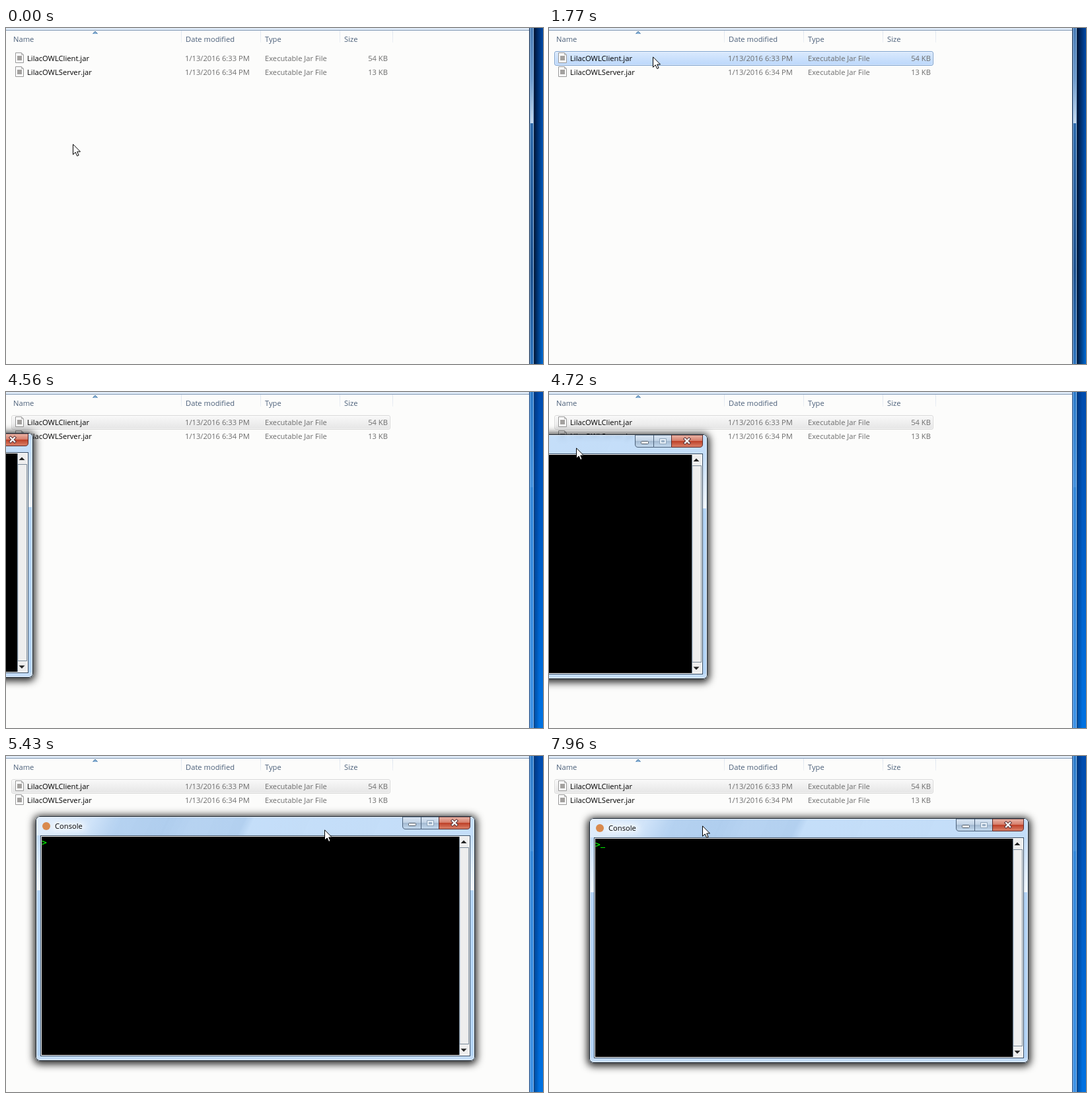
An HTML page for the animation above (8000 ms loop, 813 px wide and 508 px high).

```html
<!DOCTYPE html>
<html lang="en">
<head>
<meta charset="utf-8">
<title>File list and console</title>
<style>
  html, body { margin: 0; width: 100%; height: 100%; overflow: hidden; background: #fcfcfb; }
  svg { position: absolute; left: 0; top: 0; display: block; }
  text { font: 11.2px "Open Sans", "Noto Sans", sans-serif; }
  .head text { fill: #4c607a; }
  .info { fill: #6d6d6d; }
  #console {
    position: absolute; left: 0; top: -1px; width: 665px; height: 370px;
    border-radius: 6px;
    background:
      linear-gradient(115deg, rgba(255,255,255,.45) 4%, rgba(255,255,255,.2) 13%, rgba(120,165,212,.18) 19%,
        rgba(120,165,212,.26) 30%, rgba(120,165,212,.16) 36%, rgba(120,165,212,.22) 47%,
        rgba(200,228,255,.25) 49%, rgba(200,228,255,.2) 82%) 0 0 / 100% 29px no-repeat,
      rgba(184,214,246,.84);
    backdrop-filter: blur(2.5px);
    box-shadow: inset 0 0 0 1px #1c2a38, inset 0 0 0 2px rgba(255,255,255,.7), 0 2px 12px 3px rgba(0,0,0,.85);
  }
  #console svg { top: 1px; }
  .prompt { font: bold 13px "DejaVu Sans Mono", monospace; fill: #00e400; }
</style>
</head>
<body>
<svg width="813" height="508">
  <defs>
    <linearGradient id="hoverFill" x2="0" y2="1"><stop stop-color="#f8fbff"/><stop offset="1" stop-color="#e6f1fe"/></linearGradient>
    <linearGradient id="pickFill" x2="0" y2="1"><stop stop-color="#dbeafd"/><stop offset="1" stop-color="#bbd7fb"/></linearGradient>
    <linearGradient id="idleFill" x2="0" y2="1"><stop stop-color="#f9f9f9"/><stop offset="1" stop-color="#e5e5e5"/></linearGradient>
    <linearGradient id="divider" x2="0" y2="1"><stop stop-color="#dde5ef"/><stop offset="1" stop-color="#eceff4"/></linearGradient>
    <linearGradient id="desk" x2="0" y2="1"><stop stop-color="#004cae"/><stop offset="1" stop-color="#0072e2"/></linearGradient>
    <linearGradient id="deepShade"><stop stop-color="#000a20" stop-opacity=".92"/><stop offset=".35" stop-color="#000f2c" stop-opacity=".62"/><stop offset="1" stop-color="#00183c" stop-opacity=".08"/></linearGradient>
    <linearGradient id="softShade"><stop stop-color="#001840" stop-opacity=".45"/><stop offset=".6" stop-color="#001840" stop-opacity="0"/></linearGradient>
    <linearGradient id="edgeOn" x2="0" y2="1">
      <stop stop-color="#4a7db6"/><stop offset=".15" stop-color="#6d9bcd"/><stop offset=".283" stop-color="#c6daee"/>
      <stop offset=".284" stop-color="#2f6cad"/><stop offset=".72" stop-color="#1f5390"/><stop offset="1" stop-color="#2f76bf"/>
    </linearGradient>
    <linearGradient id="edgeOff" x2="0" y2="1">
      <stop stop-color="#2f7cc9"/><stop offset=".283" stop-color="#4593df"/><stop offset=".284" stop-color="#3488da"/><stop offset="1" stop-color="#3f93e6"/>
    </linearGradient>
  </defs>

  <rect width="792" height="3" fill="#dfeaf7"/>
  <rect y="3" width="792" height="1" fill="#8299b5"/>
  <rect x="792" width="21" height="508" fill="url(#desk)"/>
  <g id="edgeActive">
    <rect x="799" width="14" height="508" fill="url(#deepShade)"/>
    <rect x="792" width="8" height="508" fill="#0c2548"/>
    <rect x="793" width="6" height="508" fill="#8fb5dd"/>
    <rect x="794" width="4" height="508" fill="url(#edgeOn)"/>
  </g>
  <g id="edgeIdle">
    <rect x="799" width="14" height="508" fill="url(#softShade)"/>
    <rect x="792" width="8" height="508" fill="#14407a"/>
    <rect x="793" width="6" height="508" fill="#7fb6ee"/>
    <rect x="794" width="4" height="508" fill="url(#edgeOff)"/>
  </g>

  <g class="head">
    <path d="M131 9 135 5 139 9Z" fill="#8db4d8"/><path d="M131.5 8.5 135 5.2 138.5 8.5" fill="none" stroke="#3c6f9f"/>
    <g fill="url(#divider)">
      <rect x="265" y="4" width="1" height="18"/><rect x="385" y="4" width="1" height="18"/>
      <rect x="505" y="4" width="1" height="18"/><rect x="585" y="4" width="1" height="18"/>
    </g>
    <text x="11" y="21">Name</text><text x="272" y="21">Date modified</text>
    <text x="392" y="21">Type</text><text x="512" y="21">Size</text>
  </g>

  <g id="hoverLower"><rect x="8.5" y="56.5" width="573" height="21" rx="2.5" fill="url(#hoverFill)" stroke="#b8d6fb"/></g>
  <g id="hoverUpper"><rect x="8.5" y="35.5" width="573" height="21" rx="2.5" fill="url(#hoverFill)" stroke="#b8d6fb"/></g>
  <g id="picked">
    <rect x="8.5" y="35.5" width="573" height="21" rx="2.5" fill="url(#pickFill)" stroke="#7da2ce"/>
    <rect x="9.5" y="36.5" width="571" height="19" rx="1.5" fill="none" stroke="#fff" stroke-opacity=".45"/>
  </g>
  <g id="idle">
    <rect x="8.5" y="35.5" width="573" height="21" rx="2.5" fill="url(#idleFill)" stroke="#d9d9d9"/>
    <rect x="9.5" y="36.5" width="571" height="19" rx="1.5" fill="none" stroke="#fff" stroke-opacity=".5"/>
  </g>
  <g id="files"></g>
</svg>

<div id="console">
  <svg width="665" height="369">
    <defs>
      <linearGradient id="shine" x2="0" y2="1"><stop stop-color="#fff" stop-opacity="0"/><stop offset="1" stop-color="#fff" stop-opacity=".8"/></linearGradient>
      <linearGradient id="glassKey" x2="0" y2="1"><stop stop-color="#dce8f5"/><stop offset=".48" stop-color="#c0d2e5"/><stop offset=".5" stop-color="#a3b9d0"/><stop offset="1" stop-color="#c5dbf0"/></linearGradient>
      <linearGradient id="closeKey" x2="0" y2="1"><stop stop-color="#ecb9ac"/><stop offset=".48" stop-color="#d57b68"/><stop offset=".5" stop-color="#bd3f27"/><stop offset="1" stop-color="#dc846c"/></linearGradient>
      <filter id="soft" x="-30%" y="-80%" width="160%" height="260%"><feGaussianBlur stdDeviation="5"/></filter>
    </defs>
    <rect x="2" y="29" width="5" height="82" fill="url(#shine)"/>
    <rect x="658" y="29" width="5" height="82" fill="url(#shine)"/>
    <rect x="2" y="111" width="5" height="250" fill="#9cc6f2" fill-opacity=".4"/>
    <rect x="658" y="111" width="5" height="250" fill="#9cc6f2" fill-opacity=".4"/>

    <rect x="24" y="8" width="52" height="13" rx="6" fill="#fff" fill-opacity=".65" filter="url(#soft)"/>
    <circle cx="16" cy="14" r="6" fill="#d98a4e"/>
    <text x="29" y="18">Console</text>

    <g stroke="#4b6079">
      <path d="M555.5 0V14Q555.5 18.5 560 18.5H583.5V0Z" fill="url(#glassKey)"/>
      <path d="M583.5 0V18.5H610.5V0Z" fill="url(#glassKey)"/>
      <path d="M610.5 0V18.5H653Q657.5 18.5 657.5 14V0Z" fill="url(#closeKey)" stroke="#5b2a2a"/>
    </g>
    <rect x="564.5" y="9.5" width="11" height="4" rx="1" fill="#fff" stroke="#4d5a68"/>
    <path d="M592.5 5.5H602.5V13.5H592.5ZM595.5 8.5H599.5V10.5H595.5Z" fill="#e4edf6" stroke="#8ea4ba" fill-rule="evenodd"/>
    <path d="M631 6 637 12M637 6 631 12" stroke="#5c3438" stroke-width="4.4" stroke-linecap="square"/>
    <path d="M631 6 637 12M637 6 631 12" stroke="#fff" stroke-width="2.3" stroke-linecap="square"/>

    <rect x="7.5" y="28.5" width="650" height="333" fill="#fff" stroke="#3a4d62"/>
    <rect x="9" y="30" width="632" height="330"/>

    <rect x="641" y="30" width="15" height="330" fill="#eee"/>
    <path d="M641.5 30V360M641 46.5H656M641 343.5H656M655.5 46V344" stroke="#7a8a99" fill="none"/>
    <path d="M642.5 47V343" stroke="#c9d3de"/>
    <path d="M643.5 40 648 35.500 652.5 40ZM643.5 350.5H652.5L648 355Z" fill="#222"/>

    <text class="prompt" x="9" y="43">&gt;</text>
    <rect id="caret" x="17" y="43" width="7" height="1" fill="#00e400"/>
  </svg>
</div>

<svg id="pointer" width="26" height="30" style="overflow:visible">
  <path d="M.5.8V16.3L4.2 12.9 6.7 18.5 9.1 17.4 6.7 12H11.5Z" fill="#fff" stroke="#000" stroke-linejoin="round"/>
  <circle id="busy" cx="15.5" cy="-.5" r="5.5" fill="none" stroke="#3ba4dc" stroke-width="3.6"/>
</svg>

<script>
const LOOP = 8000;
const byId = id => document.getElementById(id);

const fileRow = (y, name, time, size) => `
  <path d="M14.5 ${y - 12.5}H23.5L26.5 ${y - 9.5}V${y + 2.5}H14.5Z" fill="#fbfbfb" stroke="#999"/>
  <path d="M23.5 ${y - 12}V${y - 9.5}H26" fill="none" stroke="#aaa"/>
  <rect x="17" y="${y - 8}" width="7" height="7" fill="#a3a19f"/>
  <text x="32" y="${y}">${name}</text>
  <text class="info" x="271" y="${y}">1/13/2016 ${time} PM</text>
  <text class="info" x="392" y="${y}">Executable Jar File</text>
  <text class="info" x="578" y="${y}" text-anchor="end">${size} KB</text>`;
byId('files').innerHTML =
  fileRow(50, 'LilacOWLClient.jar', '6:33', 54) + fileRow(71, 'LilacOWLServer.jar', '6:34', 13);

// Each state holds until the next one begins.
function hold(id, states) {
  const keys = states.map(([time, style]) => ({ ...style, offset: time / LOOP, easing: 'steps(1, end)' }));
  keys.push({ ...states.at(-1)[1], offset: 1 });
  byId(id).animate(keys, { duration: LOOP, iterations: Infinity });
}

const place = (id, spots) => hold(id, spots.map(([time, x, y]) =>
  [time, { transform: `translate(${x}px, ${y}px)` }]));

function show(id, from, to = LOOP) {
  const states = [[from, { opacity: 1 }]];
  if (from > 0) states.unshift([0, { opacity: 0 }]);
  if (to < LOOP) states.push([to, { opacity: 0 }]);
  hold(id, states);
}

show('edgeActive', 0, 2880);
show('edgeIdle', 2880);
show('hoverLower', 420, 540);
show('hoverUpper', 540, 1060);
show('picked', 1060, 3190);
show('idle', 3190);
show('busy', 2490, 2610);
hold('caret', [[0, { opacity: 0 }], [5730, { opacity: 1 }], [6540, { opacity: 0 }], [7960, { opacity: 1 }]]);

place('console', [
  [0, -900, 63], [4560, -624, 63], [4720, -425, 65], [4860, -275, 64], [4980, -127, 78],
  [5130, -3, 92], [5280, 2, 92], [5430, 45, 92], [5580, 58, 93], [5730, 61, 95]
]);

place('pointer', [
  [0, 101, 175], [150, 94, 122], [270, 92, 94], [420, 97, 68], [540, 104, 50], [660, 107, 45],
  [1620, 156, 43], [1770, 157, 43], [3190, -60, 83], [4720, 41, 84], [4860, 180, 88], [4980, 320, 101],
  [5130, 436, 111], [5280, 440, 111], [5430, 482, 111], [5580, 491, 113], [5730, 491, 164], [5880, 489, 193],
  [6540, 434, 181], [6680, 310, 145], [6800, 232, 118], [6950, 231, 117], [7100, 232, 108], [7250, 232, 105]
]);
</script>
</body>
</html>
```
